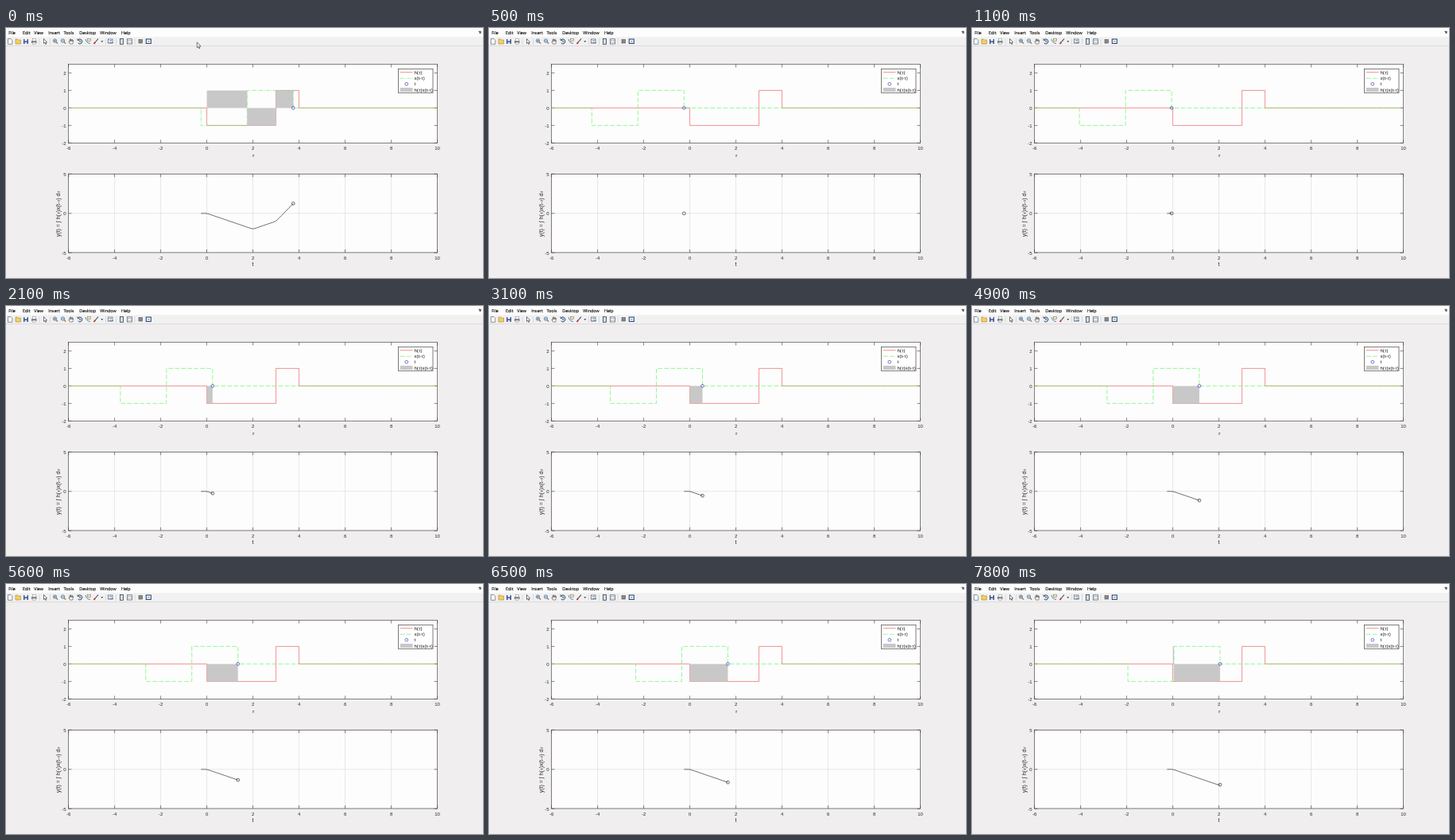
An HTML page that plays this animation: 600x314 px, repeating every 8000 ms.

```html
<!DOCTYPE html>
<html lang="en">
<head>
<meta charset="utf-8">
<title>Convolution</title>
<style>
  html, body { margin: 0; width: 100%; height: 100%; overflow: hidden; background: #f0eeef; }
  svg { display: block; width: 600px; height: 314px; }
  text { font-family: "Liberation Sans", Arial, sans-serif; font-size: 6px; fill: #262626; }
  .menu text { font-family: "Open Sans", "Noto Sans", sans-serif; font-size: 5.4px; fill: #000; stroke: #000; stroke-width: .12; }
  .label { font-size: 7px; }
  .tau { font-family: "Liberation Serif", "DejaVu Serif", serif; font-style: italic; }
  .axes { fill: none; stroke: #444; stroke-width: .65; }
  .grid { stroke: #dedede; stroke-width: .7; }
  .h { fill: none; stroke: #e83a3a; stroke-width: .55; }
  .x { fill: none; stroke: #48f848; stroke-width: .6; }
  .marker { fill: none; stroke-width: .65; }
</style>
</head>
<body>
<svg id="stage" viewBox="0 0 600 314" xmlns="http://www.w3.org/2000/svg"></svg>
<script>
const LOOP = 8000;
const GREY = '#c8c8c8';
const LEFT = 78.5, RIGHT = 542.6;
const RUN_DASH = '5.6 2.4', END_DASH = '4.5 1.5 1 1.5';
const TAU = '<tspan class="tau" dx=".4">τ</tspan>';

// Start times of the steps; before the first, the end of the previous sweep shows.
const STEP_TIMES = [400, 800, 1100, 1400, 1800, 2100, 2400, 2700, 3100, 3400, 3800, 4100,
  4400, 4600, 4900, 5300, 5600, 5800, 6100, 6500, 6800, 7100, 7500, 7800];
const T_START = -0.25, T_STEP = 0.1, T_END = 3.75;

const px = v => 252.6 + v * 29;
const topY = v => 100.4 - v * 22;
const botY = v => 232.8 - v * 9.9;
const text = (x, y, s, extra = '') => `<text x="${x}" y="${y}" ${extra}>${s}</text>`;
const path = (d, extra = '') => `<path d="${d}" ${extra}/>`;
const rect = (x, y, w, h, extra = '') => `<rect x="${x}" y="${y}" width="${w}" height="${h}" ${extra}/>`;
const outline = (color, width = .8) => `fill="none" stroke="${color}" stroke-width="${width}"`;

// Signals: h is -1 on [0,3) and 1 on [3,4); x is 1 on [0,2) and -1 on [2,4).
const h = v => v < 0 || v >= 4 ? 0 : v < 3 ? -1 : 1;
const x = v => v < 0 || v >= 4 ? 0 : v < 2 ? 1 : -1;

function segments(t) {
  const cuts = [0, 3, 4, t - 4, t - 2, t].sort((a, b) => a - b);
  return cuts.slice(1).map((to, i) => {
    const mid = (cuts[i] + to) / 2;
    return { from: cuts[i], to, value: h(mid) * x(t - mid) };
  }).filter(s => s.value && s.to - s.from > 1e-6);
}
const convolve = t => segments(t).reduce((sum, s) => sum + s.value * (s.to - s.from), 0);

function axes(y0, y1, toY, ticks, withGrid) {
  let grid = '', marks = '', labels = '';
  for (let v = -6; v <= 10; v += 2) {
    const cx = px(v);
    if (withGrid) grid += `M${cx} ${y0}V${y1}`;
    marks += `M${cx} ${y1}v-4M${cx} ${y0}v4`;
    labels += text(cx, y1 + 8.8, v, 'text-anchor="middle"');
  }
  for (const v of ticks) {
    const cy = toY(v);
    if (withGrid) grid += `M${LEFT} ${cy}H${RIGHT}`;
    marks += `M${LEFT} ${cy}h4M${RIGHT} ${cy}h-4`;
    labels += text(75.5, cy + 2.2, v, 'text-anchor="end"');
  }
  const box = style => rect(LEFT, y0, RIGHT - LEFT, y1 - y0, style);
  return box('fill="#fdfdfd"') + path(grid, 'class="grid"') +
    box('class="axes"') + path(marks, 'class="axes"') + labels;
}

function menuBar() {
  const names = ['File', 'Edit', 'View', 'Insert', 'Tools', 'Desktop', 'Window', 'Help'];
  const at = [3.3, 21, 35.3, 53.3, 72.5, 92.3, 118.3, 145];
  return rect(0, 0, 600, 11.5, 'fill="#fdfdfd"') + rect(0, 11.5, 600, 11, 'fill="#f2f1f1"') +
    rect(0, 22, 600, 1, 'fill="#dcdcdc"') +
    `<g class="menu">${names.map((n, i) => text(at[i], 7.8, n)).join('')}</g>` +
    path('M594.5 4l3 .2l-.5 3zM595 7l2-2', 'fill="#444" stroke="#444" stroke-width=".4"');
}

function toolbar() {
  const lens = (cx, sign) => `<circle cx="${cx}" cy="16" r="2.2" fill="#d5eafa" stroke="#4b7396" stroke-width=".8"/>` +
    path(`M${cx + 1.5} 17.5l2.2 2.2`, outline('#a46b32', 1.2)) + path(sign, outline('#345', .6));
  return path('M42 13v8M55.5 13v8M125.5 13v8M138.5 13v8M162 13v8', outline('#c9c9c9', .6)) +
    path('M2.5 13.5h3.5l1.8 1.8v5h-5.3z', 'fill="#fff" stroke="#567" stroke-width=".7"') +
    path('M12 14h2.5l1 1h3v5h-6.5z', 'fill="#f2cf65" stroke="#a98530" stroke-width=".6"') +
    rect(22, 14, 6, 6, 'fill="#3f5699"') + rect(23.5, 14, 3, 2.3, 'fill="#fff"') + rect(23.5, 17.8, 3, 2.2, 'fill="#dde"') +
    rect(32, 16, 6.5, 3, 'fill="#77808c"') + rect(33.3, 13.6, 4, 2.6, 'fill="#fff" stroke="#888" stroke-width=".5"') +
    rect(33.2, 18, 4.2, 2.2, 'fill="#e8e8e8" stroke="#888" stroke-width=".4"') +
    path('M47.5 13.5v6l1.4-1.2l1 2.2l.9-.5l-1-2h1.8z', 'fill="#fff" stroke="#222" stroke-width=".6"') +
    lens(61.5, 'M60.3 16h2.4M61.5 14.8v2.4') + lens(71.5, 'M70.3 16h2.4') +
    path('M80.5 20l-1.6-3l1.3.4v-3l1 2.2v-3l1.1 3l.9-2.7l.2 3l1.2-1.5l-.8 4.6z', 'fill="#fff" stroke="#444" stroke-width=".6"') +
    path('M90.5 15a3 3 0 1 1 .2 4M89.8 13.5l.6 2.2l2-.8', outline('#2f4a68', 1)) + rect(92, 15.5, 2.4, 2.4, 'fill="#79a"') +
    path('M100 14q1 5 6 5.5', outline('#3868b5', .8)) + rect(102.5, 13.5, 4, 3, 'fill="#f7e9a0" stroke="#666" stroke-width=".5"') +
    path('M110.5 20l2-2.5', outline('#b33', 1.8)) + path('M112.5 17.5l3.5-4', outline('#345', 1.1)) +
    path('M119.3 16.3h3l-1.5 1.8z', 'fill="#333"') +
    rect(128.5, 14, 5.5, 5, 'fill="#fff" stroke="#456" stroke-width=".7"') + path('M130 18.5h5M130 16h3', outline('#57a', 1)) +
    rect(143.5, 13.5, 4, 6.8, 'fill="#d5e0e4" stroke="#345" stroke-width=".8"') +
    rect(152.5, 13.8, 6, 6.2, 'fill="#fff" stroke="#456" stroke-width=".7"') +
    path('M153.5 15.5h1.5M153.5 18h1.5', outline('#47a', .8)) + path('M155.7 15.5h2M155.7 18h2', outline('#555', .6)) +
    rect(167, 14.5, 4.5, 4.5, 'fill="#888" stroke="#555" stroke-width=".6"') +
    rect(176.3, 14, 6, 5.4, 'fill="#fff" stroke="#2c4770" stroke-width="1.1"') + rect(178, 15.8, 2.6, 1.9, 'fill="#9bc"');
}

function legend() {
  const rows = [`h(${TAU})`, `x(t-${TAU})`, 't', `h(${TAU})x(t-${TAU})`];
  return rect(493.5, 51.3, 43.5, 30, 'fill="#fff" stroke="#444" stroke-width=".7"') +
    path('M496 55.6h15.5', 'class="h"') + path('M496 63.2h15.5', 'class="x" id="legendX"') +
    '<circle cx="503.8" cy="70.3" r="1.9" class="marker" stroke="#3434b8"/>' +
    rect(496, 75, 15.5, 5, `fill="${GREY}"`) +
    rows.map((s, i) => text(513.5, 57.8 + i * 7.3, s, 'style="fill:#111"')).join('');
}

const stage = document.getElementById('stage');
stage.innerHTML = rect(0, 0, 600, 314, 'fill="#f0eeef"') + menuBar() + toolbar() +
  axes(45.5, 144.4, topY, [-2, -1, 0, 1, 2], false) +
  axes(183.3, 282, botY, [-5, 0, 5], true) +
  text(310.5, 162, TAU, 'class="label" text-anchor="middle"') +
  text(310.5, 299.3, 't', 'class="label" text-anchor="middle"') +
  text(0, 0, `y(t) = ∫ h(${TAU})x(t-${TAU}) d${TAU}`, 'class="label" text-anchor="middle" transform="translate(67.8 233.5) rotate(-90)"') +
  path(`M${LEFT} ${topY(0)}H${px(0)}V${topY(-1)}H${px(3)}V${topY(1)}H${px(4)}V${topY(0)}H${RIGHT}`, 'class="h"') +
  path('', 'class="x" id="signal"') + path('', `id="area" fill="${GREY}"`) +
  '<circle id="topDot" r="1.9" class="marker" stroke="#3434b8"/>' +
  path('', `id="result" ${outline('#222', .65)}`) +
  '<circle id="botDot" r="1.9" class="marker" stroke="#222"/>' + legend() +
  path('M240.3 17.8v7l1.6-1.4l1.1 2.4l1-.5l-1.1-2.3h2.2z', 'id="cursor" fill="#fff" stroke="#222" stroke-width=".6"');

const part = Object.fromEntries([...stage.querySelectorAll('[id]')].map(el => [el.id, el]));
const set = (el, attrs) => Object.entries(attrs).forEach(([k, v]) => el.setAttribute(k, v));

function render(ms) {
  const step = STEP_TIMES.filter(s => s <= ms).length - 1;
  const ended = step < 0;
  const t = ended ? T_END : T_START + step * T_STEP;
  const count = Math.round((t - T_START) / T_STEP);
  const dash = ended ? END_DASH : RUN_DASH;

  set(part.signal, {
    d: `M${LEFT} ${topY(0)}H${px(t - 4)}V${topY(-1)}H${px(t - 2)}V${topY(1)}H${px(t)}V${topY(0)}H${RIGHT}`,
    'stroke-dasharray': dash
  });
  set(part.legendX, { 'stroke-dasharray': dash });
  set(part.area, {
    d: segments(t).map(s => `M${px(s.from)} ${topY(0)}V${topY(s.value)}H${px(s.to)}V${topY(0)}z`).join('')
  });
  const points = Array.from({ length: count + 1 }, (_, i) => {
    const v = T_START + i * T_STEP;
    return `${px(v)} ${botY(convolve(v))}`;
  });
  set(part.result, { d: 'M' + points.join('L') });
  set(part.topDot, { cx: px(t), cy: topY(0) });
  set(part.botDot, { cx: px(t), cy: botY(convolve(t)) });
  set(part.cursor, { visibility: ended ? 'visible' : 'hidden' });
}

const start = performance.now();
function tick() {
  render((performance.now() - start) % LOOP);
  requestAnimationFrame(tick);
}
tick();
</script>
</body>
</html>
```
